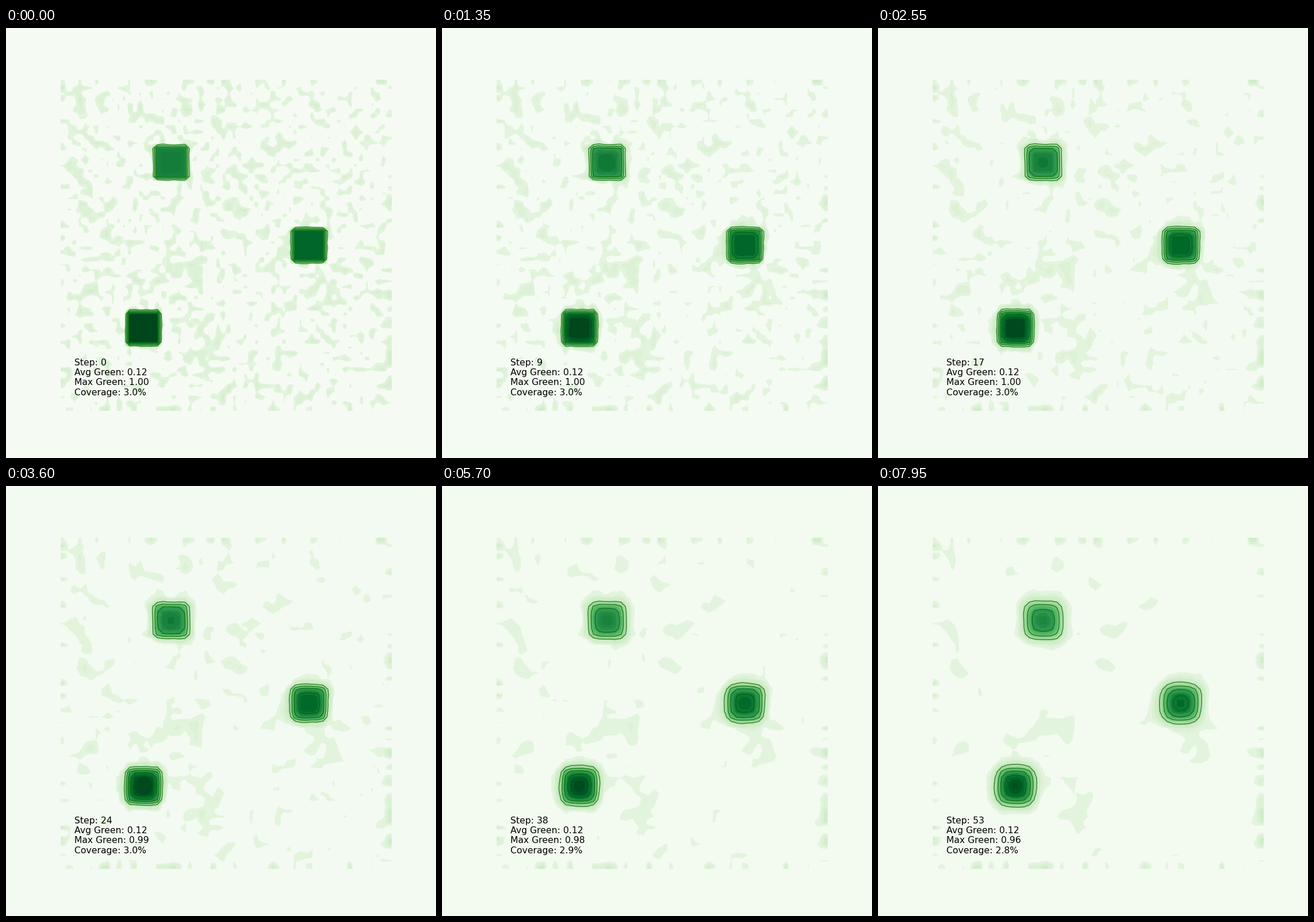
Recreate the animation shown at these times as a matplotlib script. Size 748x748 px, loop 8 s.

```python
import numpy as np
import matplotlib.pyplot as plt
from matplotlib.animation import FuncAnimation
from matplotlib.colors import ListedColormap

SIZE = 60          # cells per side
STEPS = 54
RATE = 0.0125      # share passed to each neighbour per step
WARM_UP = 2        # diffusion steps done before the first picture
TICK = 50          # ms
TICKS_PER_STEP = 3
LINE_LEVELS = 0.3 + 0.175 * np.arange(4)
PATCHES = [(20, 45, 0.8), (45, 30, 0.9), (15, 15, 1.0)]  # x, y, value


def initial_grid():
    np.random.seed(0)
    grid = np.random.rand(SIZE, SIZE) * 0.2
    for x, y, value in PATCHES:
        grid[y - 3:y + 3, x - 3:x + 3] = value
    return grid


def diffuse(grid):
    """One explicit step; the border cells stay fixed."""
    new = grid.copy()
    new[1:-1, 1:-1] += RATE * (grid[:-2, 1:-1] + grid[2:, 1:-1]
                               + grid[1:-1, :-2] + grid[1:-1, 2:]
                               - 4 * grid[1:-1, 1:-1])
    return new


def all_states():
    grid = initial_grid()
    for _ in range(WARM_UP):
        grid = diffuse(grid)
    states = []
    for _ in range(STEPS):
        states.append(grid)
        grid = diffuse(grid)
    return states


def upsample(grid, factor=6):
    pos = (np.arange(SIZE * factor) + 0.5) / factor - 0.5
    pos = np.clip(pos, 0, SIZE - 1)
    low = np.minimum(pos.astype(int), SIZE - 2)
    part = pos - low
    rows = grid[low] * (1 - part)[:, None] + grid[low + 1] * part[:, None]
    return rows[:, low] * (1 - part) + rows[:, low + 1] * part


GREENS = plt.get_cmap("Greens")(np.arange(256), bytes=True)[:, :3].astype(int)
BAND = (GREENS[:, 0] // 32) * 128 + (GREENS[:, 1] // 16) * 8 + GREENS[:, 2] // 32


def banded_colors(grid, margin=(748 / 576) ** 2 - 1):
    """Greens in flat bands, each the mean of the shades it covers.

    The lightest band also takes in the white margin around the axes.
    """
    index = np.clip(upsample(grid) * 256, 0, 255).astype(int)
    count = np.bincount(index.ravel(), minlength=256) / index.size
    count = count + 1e-9
    colors = np.empty((256, 3))
    for band in np.unique(BAND):
        inside = BAND == band
        weight = count[inside]
        total = weight @ GREENS[inside]
        amount = weight.sum()
        if band == BAND[0]:
            total = total + 255 * margin
            amount += margin
        colors[inside] = total / amount
    return (np.round(colors) + 0.25) / 255.25


states = all_states()

fig, ax = plt.subplots(figsize=(8, 8), dpi=93.5)
ax.axis("off")
image = ax.imshow(states[0], cmap="Greens", vmin=0, vmax=1,
                  origin="lower", interpolation="bilinear")
label = ax.text(2, 2, "", fontsize=12, color="black", va="bottom",
                family="DejaVu Sans", zorder=5)
shown = {"step": None, "lines": None}


def update(tick):
    step = tick // TICKS_PER_STEP
    if step == shown["step"]:
        return
    grid = states[step]
    colors = banded_colors(grid)
    image.set_data(grid)
    image.set_cmap(ListedColormap(colors))
    fig.set_facecolor(colors[0])

    if shown["lines"] is not None:
        shown["lines"].remove()
    shown["lines"] = ax.contour(grid, levels=LINE_LEVELS, colors="darkgreen",
                                linewidths=1, alpha=0.8)
    shown["step"] = step
    ax.set(xlim=(-0.5, SIZE - 0.5), ylim=(-0.5, SIZE - 0.5))

    label.set_text(f"Step: {step}\n"
                   f"Avg Green: {grid.mean():.2f}\n"
                   f"Max Green: {grid.max():.2f}\n"
                   f"Coverage: {(grid > 0.5).mean() * 100:.1f}%")


animation = FuncAnimation(fig, update, frames=160, interval=TICK,
                          init_func=lambda: update(0), repeat=True,
                          repeat_delay=0, blit=False)
plt.show()
```
